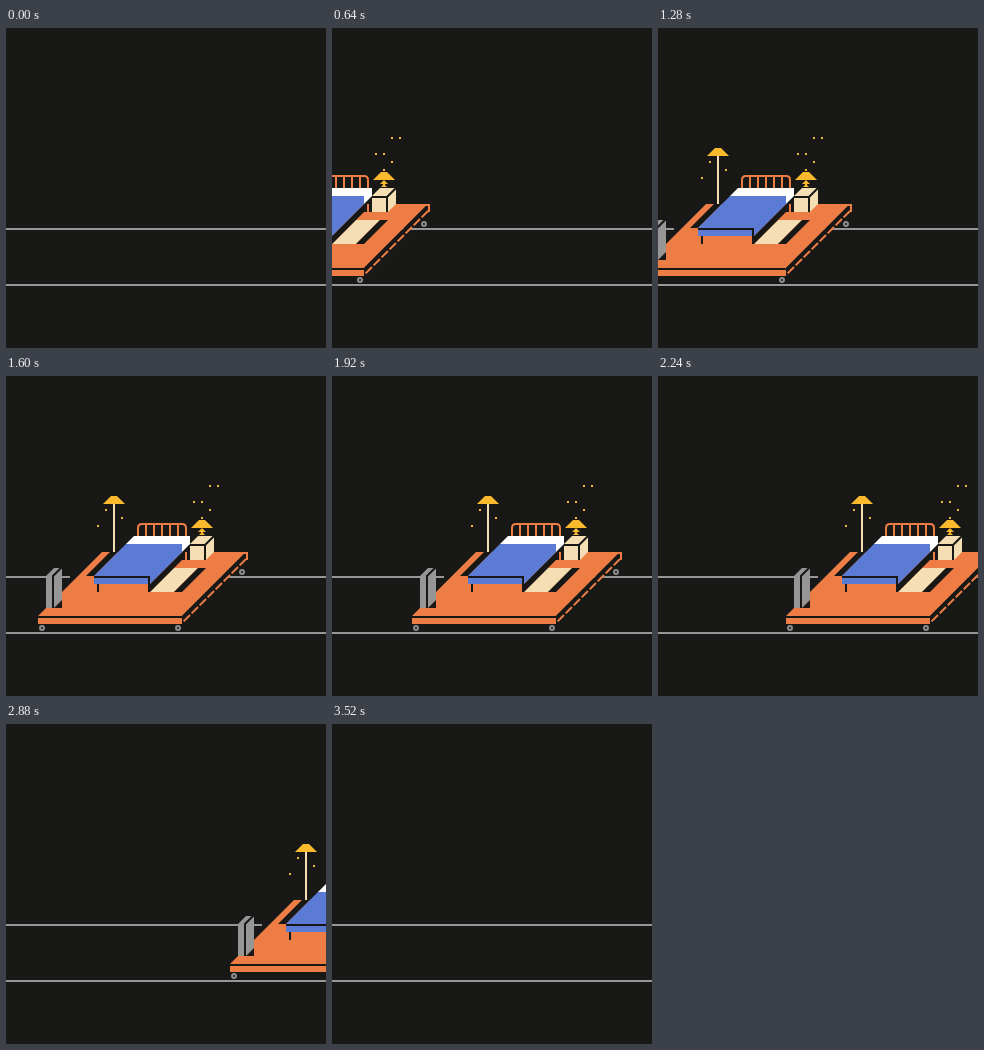
Write an HTML page that moves like this. It is 320 by 320 pixels and loops after 3680 ms.

```html
<!DOCTYPE html>
<html lang="en">
<head>
<meta charset="utf-8">
<title>Bedroom on rails</title>
<style>
html, body { margin: 0; width: 100%; height: 100%; overflow: hidden; background: #181816; }
svg { display: block; width: 100vw; height: 100vh; }
.ink { fill: #181816; }
.orange { fill: #ed7d45; }
.blue { fill: #5b7bd5; }
.yellow { fill: #fdb92e; }
.cream { fill: #f5deb3; }
.white { fill: #fff; }
.grey { fill: #969696; }
.ink-line { fill: none; stroke: #181816; stroke-width: 2; }
.orange-line { fill: none; stroke: #ed7d45; stroke-width: 2; }
.wheel { fill: #181816; stroke: #8c8c8c; stroke-width: 2; }
</style>
</head>
<body>
<svg viewBox="0 0 320 320">
  <path class="grey" d="M0 200h320v2H0zM0 256h320v2H0z"/>
  <g id="room"></g>
</svg>
<script>
const STEP = 160, STEPS = 23, STRIDE = 24, START = -288;
const room = document.getElementById('room');

function add(tag, attrs) {
  const el = document.createElementNS('http://www.w3.org/2000/svg', tag);
  for (const key in attrs) el.setAttribute(key, attrs[key]);
  room.append(el);
}
const shape = (cls, d, extra) => add('path', { class: cls, d, ...extra });
const box = (cls, x, y, width, height) => add('rect', { class: cls, x, y, width, height });
const shade = (x, y) => shape('yellow', `M${x - 11} ${y + 8}l8 -8h6l8 8z`);

// Platform
box('ink', 112, 200, 10, 2);
shape('orange', 'M80 240L144 176H288L224 240z');
shape('ink', 'M288 176V184L224 248V240z');
shape('orange', 'M80 242H224V248H80z');
box('ink', 80, 240, 146, 2);
box('orange', 256, 176, 34, 2);
box('orange', 288, 176, 2, 8);
shape('orange-line', 'M288 183L224 247', { 'stroke-dasharray': '9 2.314' });
for (const [cx, cy] of [[84, 252], [220, 252], [284, 196]])
  add('circle', { class: 'wheel', cx, cy, r: 2 });

// Cabinet
shape('grey', 'M88 200L96 192H104V224L96 232H88z');
shape('ink', 'M104 224V232H96z');
shape('ink-line', 'M95 232V200L104 191');

// Rug
shape('cream', 'M216 192H240L216 216H192z');
shape('ink', 'M240 192H248L224 216H216z');

// Bed
shape('ink', 'M152 176H160L136 200H128z');
shape('ink', 'M232 168V176L192 216V208z');
box('ink', 224, 176, 8, 8);
box('orange', 227, 176, 2, 8);
let rails = 'M180 161V152Q180 148 184 148H224Q228 148 228 152V161';
for (let x = 188; x < 228; x += 8) rails += `M${x} 148V161`;
shape('orange-line', rails);
shape('blue', 'M168 168H224V176L192 208H136V200z');
shape('white', 'M176 160H232V168L224 176V168H168z');
shape('ink-line', 'M136 201H191V216M140 208V216');

// Floor lamp
box('cream', 155, 128, 2, 48);
shade(156, 120);

// Nightstand and its lamp
shape('cream', 'M232 168L240 160H256V176L248 184H232z');
shape('ink-line', 'M232 169H247V184M247 169L256 160');
shade(244, 144);
shape('yellow', 'M244 152L248 156H245V157L247 159H241L243 157V156H240z');

// Sparks
const sparks = [[148, 134], [164, 142], [140, 150], [252, 110], [260, 110],
  [236, 126], [244, 126], [252, 134], [244, 142]];
for (const [x, y] of sparks) box('yellow', x - 1, y - 1, 2, 2);

function draw(now) {
  const k = Math.floor(now / STEP) % STEPS;
  const x = k ? START + k * STRIDE : -400;
  room.setAttribute('transform', `translate(${x} 0)`);
}
const origin = performance.now();
draw(0);
requestAnimationFrame(function tick() {
  draw(performance.now() - origin);
  requestAnimationFrame(tick);
});
</script>
</body>
</html>
```
